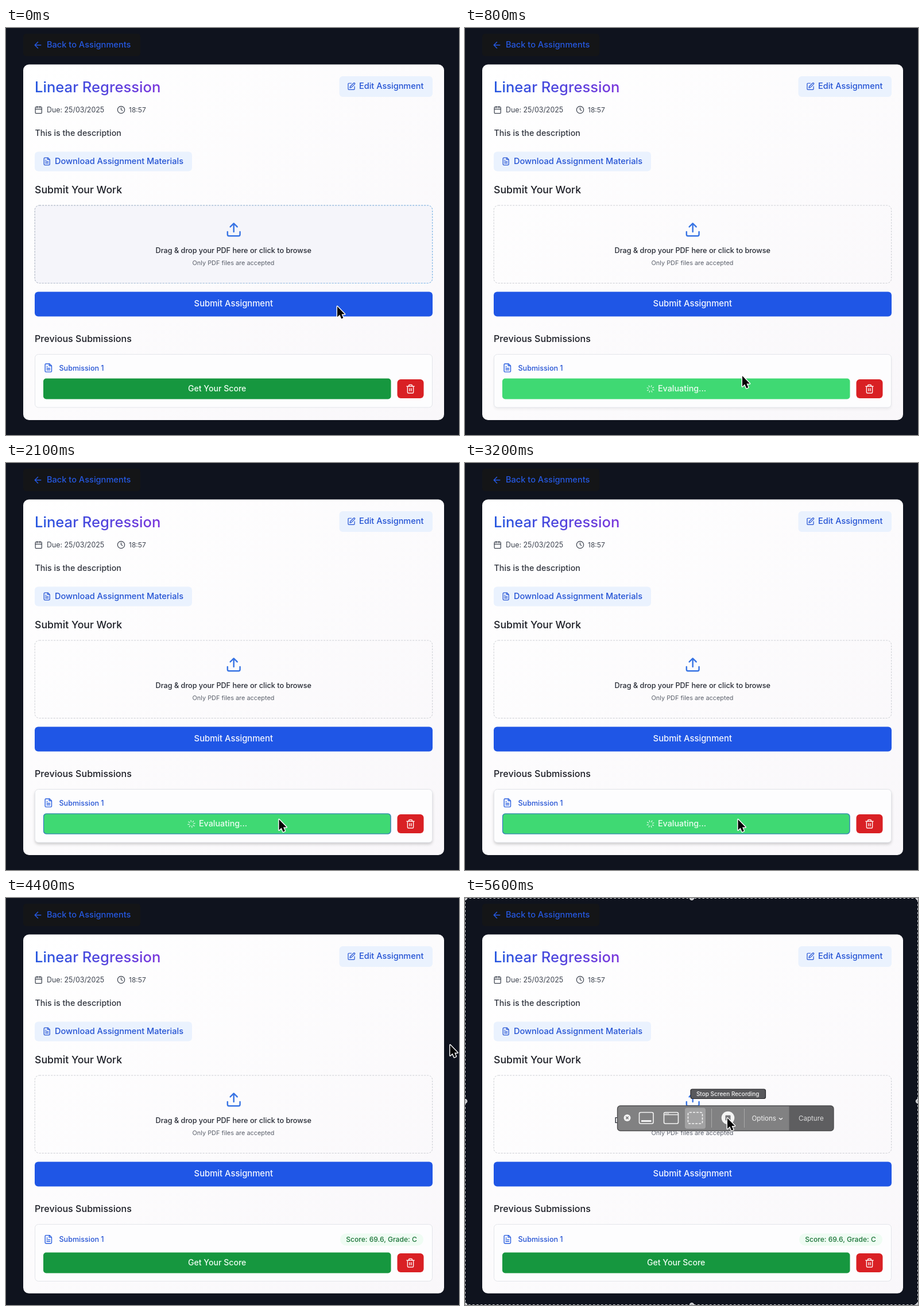
These frames come from a looping animation (789 by 709 pixels, 5.7 s). An HTML page:

```html
<!DOCTYPE html>
<html lang="en">
<head>
<meta charset="utf-8">
<title>Assignment page</title>
<style>
  html, body { margin: 0; width: 100%; height: 100%; overflow: hidden; background: #0f131e; }
  svg { display: block; width: 789px; height: 709px; }
  text { font-family: Inter, "Open Sans", sans-serif; font-optical-sizing: none; white-space: pre; }
</style>
</head>
<body>
<svg id="stage" viewBox="0 0 789 709" xmlns="http://www.w3.org/2000/svg"></svg>
<script>
const LOOP = 5700, STEP = 100;
const BLUE = '#2453d4', INK = '#1c1e26', SOFT = '#3d434f';

const ICONS = {
  back: '<path d="M12 19l-7-7 7-7M19 12H5"/>',
  calendar: '<rect x="3" y="4" width="18" height="18" rx="2"/><path d="M8 2v4M16 2v4M3 10h18"/>',
  clock: '<circle cx="12" cy="12" r="10"/><path d="M12 6v6l4 2"/>',
  edit: '<path d="M12 3H5a2 2 0 0 0-2 2v14a2 2 0 0 0 2 2h14a2 2 0 0 0 2-2v-7M18.4 2.6a2.1 2.1 0 0 1 3 3L12 15l-4 1 1-4z"/>',
  file: '<path d="M15 2H6a2 2 0 0 0-2 2v16a2 2 0 0 0 2 2h12a2 2 0 0 0 2-2V7zM14 2v5h6M10 9H8M16 13H8M16 17H8"/>',
  upload: '<path d="M21 15v4a2 2 0 0 1-2 2H5a2 2 0 0 1-2-2v-4M17 8l-5-5-5 5M12 3v12"/>',
  trash: '<path d="M3 6h18M19 6v14a2 2 0 0 1-2 2H7a2 2 0 0 1-2-2V6M8 6V4a2 2 0 0 1 2-2h4a2 2 0 0 1 2 2v2M10 11v6M14 11v6"/>',
  loader: [...Array(8)].map((_, i) => `<path d="M12 2v4" transform="rotate(${i * 45} 12 12)"/>`).join('')
};

const icon = (name, cx, cy, size, color, id = '') =>
  `<g transform="translate(${cx} ${cy}) scale(${size / 24})"><g ${id && `id="${id}"`}>
   <g transform="translate(-12 -12)" fill="none" stroke="${color}" stroke-width="2"
   stroke-linecap="round" stroke-linejoin="round">${ICONS[name]}</g></g></g>`;
const text = (str, x, y, size, color, weight = 500, anchor = 'start') =>
  `<text x="${x}" y="${y}" font-size="${size}" font-weight="${weight}" fill="${color}" text-anchor="${anchor}">${str}</text>`;
const box = (x, y, w, h, r, fill, extra = '') =>
  `<rect x="${x}" y="${y}" width="${w}" height="${h}" rx="${r}" fill="${fill}" ${extra}/>`;

const page = `
  ${box(30, 10, 204, 39, 5, '#141517')}
  ${icon('back', 55.5, 29.8, 18, '#2558e0')}
  ${text('Back to Assignments', 71, 34, 14.6, '#2558e0')}
  ${box(30, 63.5, 733, 619.5, 10, 'url(#paper)', 'id="card"')}
  ${text('Linear Regression', 50, 111.5, 25.6, 'url(#title)')}
  ${box(580.5, 84, 162.5, 36, 6, '#eaf2fe')}
  ${icon('edit', 601.5, 101.8, 14.8, BLUE)}
  ${text('Edit Assignment', 615, 106, 14.5, BLUE)}
  ${icon('calendar', 56.7, 142.5, 14.8, SOFT)}
  ${text('Due: 25/03/2025', 71, 146.8, 12.4, SOFT, 400)}
  ${icon('clock', 200.5, 142.5, 14.8, SOFT)}
  ${text('18:57', 214, 146.8, 12, SOFT, 400)}
  ${text('This is the description', 50.5, 187.5, 14.25, '#30343e')}
  ${box(50, 215.5, 274, 34, 6, '#eaf2fe')}
  ${icon('file', 71.2, 232.3, 15, BLUE)}
  ${text('Download Assignment Materials', 85, 237, 14.55, BLUE)}
  ${text('Submit Your Work', 50, 287.8, 17.7, INK)}
  ${box(50.2, 309, 692.5, 135.5, 8, '#f5f5fa', 'id="dropFill"')}
  ${box(50.2, 309, 692.5, 135.5, 8, 'none', 'stroke="#cbcdd3" stroke-dasharray="3 2"')}
  ${box(50.2, 309, 692.5, 135.5, 8, 'none', 'id="dropEdge" stroke="url(#edge)" stroke-dasharray="3 2"')}
  ${icon('upload', 396.7, 351.3, 29, '#3874e4')}
  ${text('Drag &amp; drop your PDF here or click to browse', 396.3, 391.6, 12.65, '#262a34', 500, 'middle')}
  ${text('Only PDF files are accepted', 396, 412.6, 10.9, '#5b606b', 400, 'middle')}
  ${box(50, 459.5, 693, 43, 6, '#1f56e6')}
  ${text('Submit Assignment', 396.3, 485.2, 14.8, '#f4f7ff', 500, 'middle')}
  ${text('Previous Submissions', 50, 547.4, 16.1, INK)}
  ${box(50.5, 568.5, 692, 92.5, 6, '#fff', 'id="lift" filter="url(#shadow)"')}
  ${box(50.5, 568.5, 692, 92.5, 6, '#fdfdfe', 'id="row" stroke="#e3e5ea"')}
  <g id="label">
    ${icon('file', 73.8, 592, 17, '#2b60e0')}
    ${text('Submission 1', 92.5, 596.6, 12.55, BLUE)}
  </g>
  <g id="score">
    ${box(582, 584.5, 145, 21, 10.5, '#effcf3')}
    ${text('Score: 69.6, Grade: C', 654, 599, 12.1, '#1b7438', 500, 'middle')}
  </g>
  <g id="actions">
    ${box(65, 610.5, 605.5, 36, 5, '#16973f', 'id="go"')}
    ${box(65.5, 611, 604.5, 35, 5, 'none', 'id="ring" stroke="#3b74c8" stroke-width="1.2"')}
    <g id="idle">${text('Get Your Score', 367.7, 633.2, 14.1, '#f0fff4', 500, 'middle')}</g>
    <g id="busy">
      ${icon('loader', 323, 628.7, 15, '#d6f8e1', 'spin')}
      ${text('Evaluating...', 336, 633.2, 14.3, '#ecfdf2')}
    </g>
    ${box(681.5, 612, 46, 33, 6, '#d92024')}
    ${icon('trash', 704.5, 628.7, 17.5, '#fff0f0')}
  </g>`;

const handles = [[0, 0], [395, 0], [789, 0], [0, 354], [789, 354], [0, 709], [395, 709], [789, 709]]
  .map(([x, y]) => `<circle cx="${x}" cy="${y}" r="3.6" fill="#b5b7bb" stroke="#fff"/>`).join('');
const line = (d, w = 1.6, extra = '') =>
  `<path d="${d}" fill="none" stroke="#f4f4f4" stroke-width="${w}" ${extra}/>`;
const outline = 'stroke="#f4f4f4" stroke-width="1.6"';

const recorder = `
  <rect x=".5" y=".5" width="788" height="708" fill="none" stroke="#11141c"/>
  <rect x=".5" y=".5" width="788" height="708" fill="none" stroke="#d4d6da" stroke-dasharray="3.5 3.5"/>
  ${handles}
  ${box(265.5, 362, 376.5, 43.5, 5, '#818182')}
  <path d="M564.5 362H637a5 5 0 0 1 5 5V400.5a5 5 0 0 1-5 5H564.5z" fill="#5e5e60"/>
  ${box(265.5, 362, 376.5, 43.5, 5, 'none', 'stroke="#4b4b4d" stroke-width="1.3"')}
  ${box(383, 365.5, 36, 36.5, 4, '#a2a2a3')}
  <circle cx="282.5" cy="383" r="6" fill="#f4f4f4"/>
  <path d="M280.3 380.8l4.4 4.4m0-4.4l-4.4 4.4" stroke="#6d6d6f" stroke-width="1.3"/>
  ${box(303.5, 373.5, 24.5, 19.5, 2.5, 'none', outline)}
  ${line('M307 388.5h17.5', 3)}
  ${box(346.5, 373.5, 25, 19.5, 2.5, 'none', outline)}
  ${line('M347 377.5h24', 1.4)}
  ${line('M349 375.5h6', 1.6, 'stroke-dasharray="1.4 .9"')}
  ${box(388.5, 373.5, 25, 19.5, 2.5, 'none', outline + ' stroke-dasharray="4 2"')}
  ${line('M429.5 367v33M486.5 367v33', 1, 'opacity=".35"')}
  <circle cx="458" cy="383" r="11.3" fill="#f4f4f4"/>
  ${box(453.5, 378.5, 9, 9, 1, '#77777a')}
  ${text('Options', 499.5, 388, 11.6, '#f1f1f1', 400)}
  ${line('M547 383.2l3 2.6 3-2.6', 1.4)}
  ${text('Capture', 581, 388, 11.6, '#dcdcdc', 400)}
  <g id="tip">
    ${box(393, 333, 130.5, 16.5, 3, '#59595c', 'stroke="#232326" stroke-width="1.2"')}
    ${text('Stop Screen Recording', 457.7, 345, 10, '#f3f3f3', 500, 'middle')}
  </g>`;

const defs = `<defs>
  <linearGradient id="paper" x2="1" y2="1">
    <stop stop-color="#fff"/><stop offset="1" stop-color="#f9f7fa"/></linearGradient>
  <linearGradient id="title" gradientUnits="userSpaceOnUse" x1="51" y1="0" x2="268" y2="0">
    <stop stop-color="#2657df"/><stop offset="1" stop-color="#7a37dc"/></linearGradient>
  <linearGradient id="edge"><stop stop-color="#b4bccb"/><stop offset="1" stop-color="#78b6ee"/></linearGradient>
  <filter id="shadow" x="-5%" y="-20%" width="110%" height="150%">
    <feDropShadow dx="0" dy="3" stdDeviation="2.5" flood-opacity=".2"/></filter>
</defs>`;

const pointer = `<g id="pointer"><path d="M0 0V18.5L4.2 14.6 7.2 21.4 10.4 20 7.5 13.5H13Z"
  fill="#050505" stroke="#fff" stroke-width="2.8" stroke-linejoin="round" paint-order="stroke"/></g>`;

document.getElementById('stage').innerHTML =
  defs + page + `<g id="recorder">${recorder}</g>` + pointer;
const el = id => document.getElementById(id);

// Tracks: [ms, value, ...]
const MOVE = [[0, 577, 485], [100, 570, 496], [300, 520, 574], [500, 487, 617], [700, 484, 612],
  [800, 483, 606], [1000, 478, 615], [1200, 475.5, 621], [3300, 475.5, 621], [3500, 478, 591],
  [3700, 482, 541.5], [3900, 540, 467], [4100, 654, 361], [4300, 748, 278], [4400, 773.5, 256],
  [5100, 773.5, 256], [5300, 600, 338], [5500, 457, 383.5], [5700, 457, 383.5]];
const GO = [[0, 22, 151, 63], [400, 22, 151, 63], [500, 23, 131, 58], [600, 23, 131, 58],
  [700, 63, 217, 115], [3300, 63, 217, 115], [3400, 23, 131, 58], [3700, 23, 131, 58], [3900, 22, 151, 63]];
const RING = [[800, 0], [1000, 1], [3600, 1], [3700, .3], [3800, 0]];
const LIFT = [[600, 0], [800, .3], [1000, 1], [3700, 1], [4000, 0]];
const DROP = [[0, 1], [100, .8], [400, 0]];

function at(track, t) {
  const i = track.findIndex(k => k[0] > t);
  if (i === 0) return track[0].slice(1);
  if (i < 0) return track[track.length - 1].slice(1);
  const a = track[i - 1], b = track[i], p = (t - a[0]) / (b[0] - a[0]);
  return a.slice(1).map((v, n) => v + (b[n + 1] - v) * p);
}
const show = (id, on) => el(id).setAttribute('visibility', on ? 'inherit' : 'hidden');
const fade = (id, track, t) => el(id).setAttribute('opacity', at(track, t)[0]);
const shift = (id, x, y) => el(id).setAttribute('transform', `translate(${x} ${y})`);

function draw(t) {
  const busy = t >= 700 && t < 3400, scored = t >= 3400;
  show('busy', busy);
  show('idle', !busy);
  show('score', scored);
  show('recorder', t >= 5200);
  show('tip', t >= 5500);

  const grow = scored ? 6.5 : 0;
  el('card').setAttribute('height', 619.5 + grow * .9);
  el('row').setAttribute('height', 92.5 + grow);
  el('lift').setAttribute('height', 92.5 + grow);
  shift('label', 0, scored ? 2.7 : 0);
  shift('actions', 0, scored ? 7 : 0);

  el('go').setAttribute('fill', `rgb(${at(GO, t).map(Math.round)})`);
  fade('ring', RING, t);
  fade('lift', LIFT, t);
  fade('dropFill', DROP, t);
  fade('dropEdge', DROP, t);
  el('spin').setAttribute('transform', `rotate(${t * .36})`);
  shift('pointer', ...at(MOVE, t));
}

const start = performance.now();
function tick(now) {
  const t = Math.max(0, now - start) % LOOP;
  draw(Math.floor(t / STEP) * STEP);
  requestAnimationFrame(tick);
}
draw(0);
requestAnimationFrame(tick);
</script>
</body>
</html>
```
